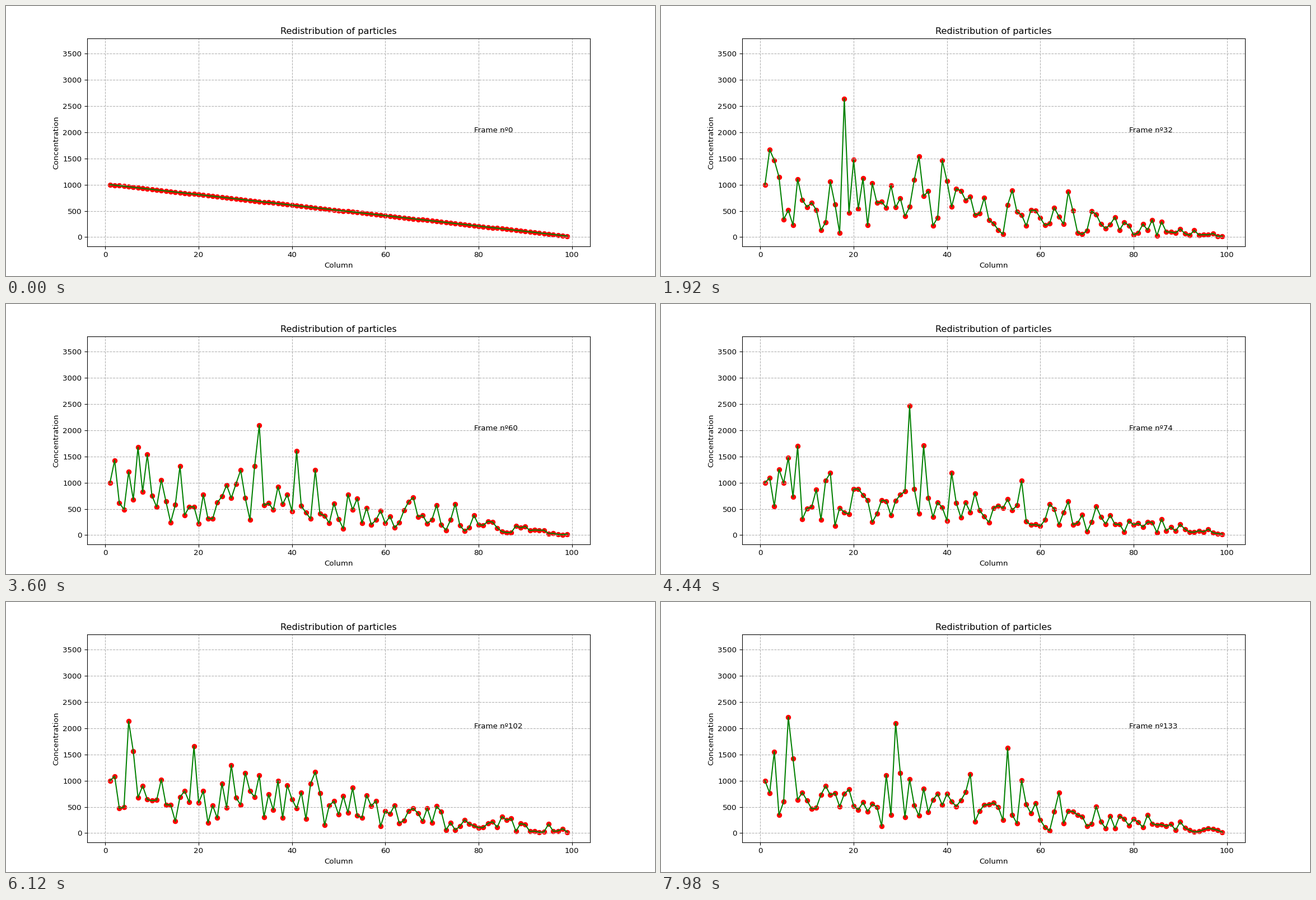
Animation of 1159x483 px, one loop 8000 ms. Source, as a matplotlib script:

```python
import numpy as np
import matplotlib.pyplot as plt
from matplotlib.animation import FuncAnimation

WIDTH, HEIGHT = 1159, 483
DPI = 96.6
STEP_MS = 60
TICK_MS = 20
LOOP_MS = 8000
STEPS = -(-LOOP_MS // STEP_MS)
SHAPE = 3  # higher values make the sharing more even
CEILING = 3490

cols = np.arange(1, 100)
profile = 1010.0 - 10 * cols


def redistribute(state, rng):
    """Share the particles of neighbouring columns; the two ends stay fixed."""
    for i in rng.permutation(len(state) - 1):
        total = state[i] + state[i + 1]
        state[i] = total * rng.beta(SHAPE, SHAPE)
        state[i + 1] = total - state[i]
        state[0], state[-1] = profile[0], profile[-1]
    return np.minimum(state, CEILING)


def simulate():
    rng = np.random.default_rng(7)
    history = [profile]
    for _ in range(STEPS - 1):
        history.append(redistribute(history[-1].copy(), rng))
    return history


history = simulate()

fig, ax = plt.subplots(figsize=(WIDTH / DPI, HEIGHT / DPI), dpi=DPI)
ax.set(title="Redistribution of particles", xlabel="Column",
       ylabel="Concentration", xlim=(-3.9, 103.9), ylim=(-175.5, 3789))
ax.grid(linestyle="--")
dots = ax.scatter(cols, profile, color="red")
line, = ax.plot(cols, profile, color="green")
label = ax.text(79, 2000, "")


def update(tick):
    step = tick * TICK_MS // STEP_MS
    values = history[step]
    dots.set_offsets(np.column_stack([cols, values]))
    line.set_ydata(values)
    label.set_text(f"Frame nº{step}")
    return dots, line, label


anim = FuncAnimation(fig, update, frames=LOOP_MS // TICK_MS,
                     interval=TICK_MS, repeat=True, repeat_delay=0)
plt.show()
```
